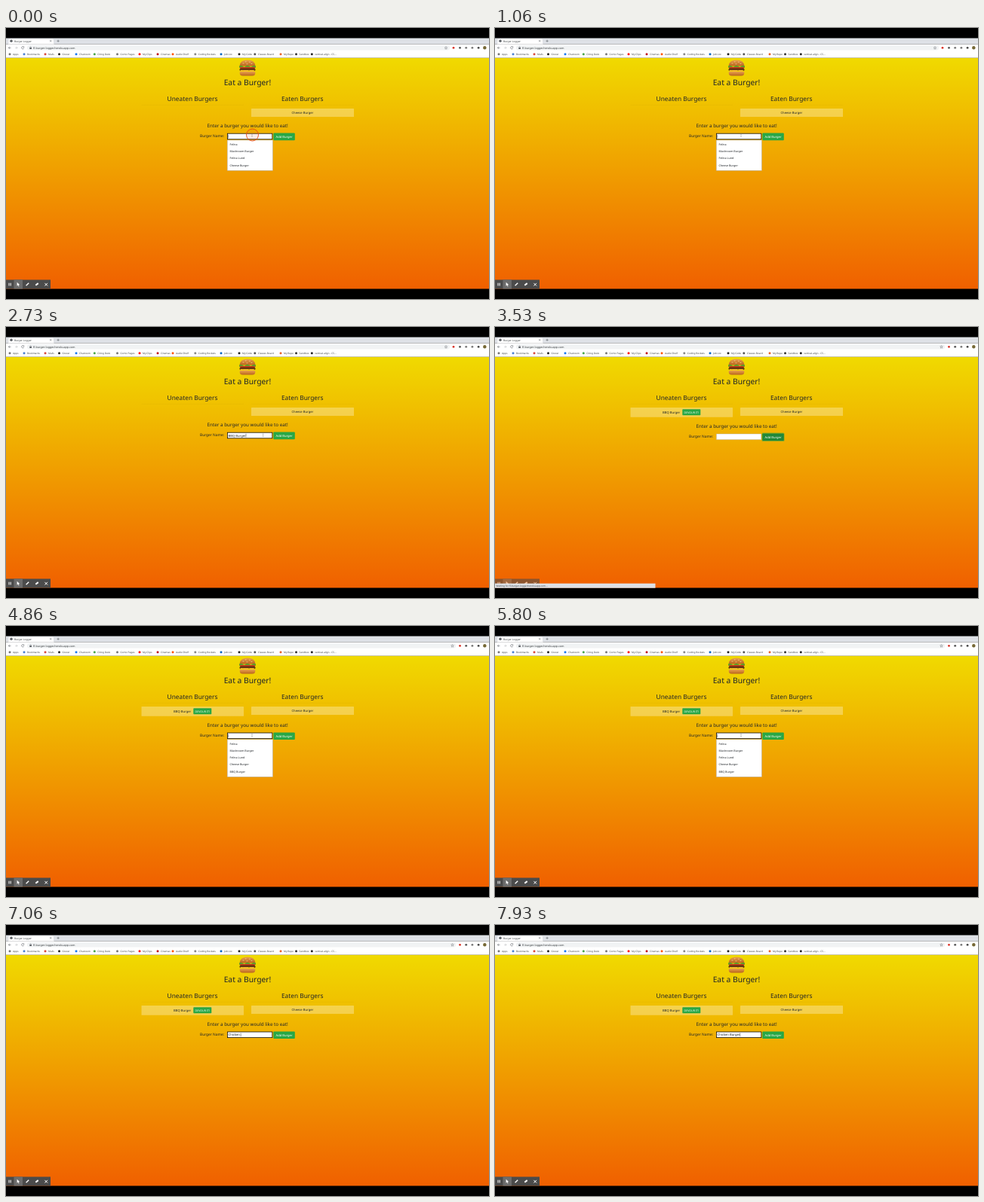
Write an HTML page that moves like this. It is 640 px wide and 360 px high and loops after 8 s.

```html
<!DOCTYPE html>
<html lang="en">
<head>
<meta charset="utf-8">
<title>Burger Logger</title>
<style>
html, body { margin: 0; width: 100%; height: 100%; overflow: hidden; background: #000; }
svg { display: block; width: 100vw; height: 100vh; }
text { font-family: "Noto Sans", "Open Sans", sans-serif; text-rendering: geometricPrecision; fill: #212529; white-space: pre; }
.mid { text-anchor: middle; }
.chrome text { fill: #3c4043; font-size: 3.2px; }
.line { fill: none; stroke: #5f6368; stroke-width: .6; }
.card { fill: #fff; fill-opacity: .3; }
.body { font-size: 4.17px; }
.white { fill: #fff; }
</style>
</head>
<body>
<svg viewBox="0 0 640 360">
  <defs>
    <linearGradient id="sky" x1="0" y1="0" x2="0" y2="1">
      <stop offset="0" stop-color="#f0da00"/><stop offset="1" stop-color="#f06000"/>
    </linearGradient>
    <linearGradient id="bun" x1="0" y1="0" x2="0" y2="1">
      <stop offset="0" stop-color="#e9a04a"/><stop offset="1" stop-color="#b9641f"/>
    </linearGradient>
  </defs>
  <rect width="640" height="360"/>
  <rect y="39.5" width="640" height="307" fill="url(#sky)"/>

  <g class="chrome">
    <rect y="13.5" width="640" height="8" fill="#dee1e6"/>
    <path d="M2 21.5Q3.500 21.500 3.500 20V16Q3.500 14.500 5 14.500H61.500Q63 14.500 63 16V20Q63 21.500 64.500 21.500Z" fill="#fff"/>
    <rect y="21.500" width="640" height="18" fill="#fff"/>
    <circle cx="7" cy="17.300" r="1.700" fill="#5f6368"/>
    <text x="11" y="18.500" style="font-size:3.35px">Burger Logger</text>
    <path class="line" d="M58.200 16.300l2 2m0-2l-2 2M67.500 17.300h3.200m-1.600-1.600v3.200"/>
    <path class="line" d="M6.500 26.300H3.500m1.400-1.500l-1.500 1.500 1.500 1.500M23.600 25.500A1.600 1.600 0 1 0 23.700 26.800M23.800 24.500v1.200h-1.200"/>
    <path class="line" opacity=".4" d="M12 26.300h3m-1.400-1.500l1.500 1.500-1.500 1.500"/>
    <rect id="omnibox" x="28" y="23" width="560" height="6.600" rx="3.300" fill="#f1f3f4"/>
    <path d="M31.300 26h2.600v2h-2.600z" fill="#5f6368"/>
    <path class="line" style="stroke-width:.4" d="M31.900 26v-.6a.7.7 0 0 1 1.400 0v.6"/>
    <text x="36" y="27.600" style="font-size:3.7px">fl-burger-logger.herokuapp.com</text>
    <g id="tools">
      <path id="star" class="line" style="stroke-width:.4" d="M0-1.700l.5 1.200 1.300.1-1 .9.300 1.300L0 1.100l-1.100.7.300-1.300-1-.9 1.300-.1z"/>
    </g>
    <g id="bookmarks"></g>
    <path d="M0 39.500H640" stroke="#dadce0" stroke-width=".4"/>
  </g>

  <g id="burger" transform="translate(320 53)">
    <path d="M-10.500-2.500Q-10-10.500 0-10.500T10.500-2.500Z" fill="url(#bun)"/>
    <path d="M-6-6h.9m2.300-2.200h.9M-1-5.200h.9M2.500-7.800h.9M5-5.500h.9" stroke="#f8dfa5" stroke-width=".7" stroke-linecap="round"/>
    <path d="M-11-2.500q2.200-1.300 4.400 0t4.400 0 4.400 0 4.400 0 4.400 0v1.900q-2.200 1.600-4.400 0t-4.400 0-4.400 0-4.400 0-4.400 0z" fill="#5f9d27"/>
    <rect x="-10" y="-.9" width="20" height="1.600" rx=".8" fill="#cf3020"/>
    <rect x="-10.500" y=".5" width="21" height="3.600" rx="1.700" fill="#54260f"/>
    <path d="M-10 2.800H10L6 5.600 2 3.600-3 6-6 3.800-8 5z" fill="#f6bd2c"/>
    <path d="M-10.200 5H10.200V7.500Q10 10.500 6.500 10.500H-6.500Q-10 10.500-10.200 7.500Z" fill="url(#bun)"/>
  </g>
  <text class="mid" x="320" y="75.900" font-size="10.3">Eat a Burger!</text>
  <g class="mid" font-size="8.34">
    <text x="247" y="96.500">Uneaten Burgers</text>
    <text x="392.700" y="96.500">Eaten Burgers</text>
  </g>
  <path d="M179.500 102.300H315M325 102.300H461" stroke="#000" stroke-opacity=".1" stroke-width=".3"/>
  <rect class="card" x="325" y="107" width="136" height="10.900" rx=".5"/>
  <text class="mid body" x="392.900" y="114.100">Cheese Burger</text>
  <g id="uneaten">
    <rect class="card" x="179.500" y="107" width="135.500" height="12.700" rx=".5"/>
    <text class="body" x="222" y="114.500">BBQ Burger</text>
    <rect x="248.300" y="109.300" width="24" height="8" rx=".8" fill="#28a745"/>
    <text class="mid white" x="260.300" y="114.600" font-size="3.6">DEVOUR IT!</text>
  </g>

  <g id="form">
    <text class="mid" x="320.200" y="132.100" font-size="6.29">Enter a burger you would like to eat!</text>
    <text x="257" y="145.300" font-size="4.87">Burger Name:</text>
    <rect id="field" x="293.400" y="140.200" width="59.400" height="7.600" fill="#fff"/>
    <text id="typed" class="body" x="294.500" y="145.500"></text>
    <path id="caret" d="M0 141.700v4.700" stroke="#000" stroke-width=".4"/>
    <rect id="glow" x="353.500" y="138.800" width="30" height="11.300" rx="1.500" fill="#28a745" opacity=".5"/>
    <rect id="add" x="354.300" y="139.600" width="28.500" height="9.700" rx="1"/>
    <text class="mid white" x="368.600" y="146" font-size="4.1">Add Burger</text>
    <g id="list">
      <rect id="panel" x="293.200" y="149" width="60.300" fill="#fff" stroke="#999" stroke-width=".4"/>
      <g id="items" font-size="3.66"></g>
    </g>
  </g>

  <g id="recorder">
    <rect y="334.500" width="59" height="12" fill="#4b4b4b"/>
    <rect x="10.500" y="334.500" width="11.500" height="12" fill="#6c6c6c"/>
    <g fill="none" stroke="#fff" stroke-width="1">
      <path d="M4 338.700v3.800m2.200-3.800v3.800M51.400 338.900l3.600 3.600m0-3.600l-3.600 3.600"/>
      <path d="M26.600 342.300l3.600-3.600" stroke-width="1.300"/>
      <path d="M39.300 341.800l3.400-2.700" stroke-width="2"/>
    </g>
    <path d="M14.600 337.800l3.700 3.500h-1.700l.9 1.900-.8.300-.8-1.900-1.300 1.200z" fill="#fff"/>
  </g>
  <g id="status" class="chrome">
    <rect y="340.700" width="212.500" height="6" fill="#dee1e6"/>
    <text x="1.500" y="344.800">Waiting for fl-burger-logger.herokuapp.com...</text>
  </g>

  <circle id="ring" r="8" fill="#e04010" fill-opacity=".1" stroke="#e64a19" stroke-width=".9"/>
  <path id="beam" d="M-.8-1.700H.8M0-1.700V1.700M-.8 1.700H.8" stroke="#777" stroke-width=".4"/>
  <path id="arrow" d="M0 0l3.200 3.100H1.500l.8 1.800-.7.300-.8-1.800L0 4.500z" stroke="#fff" stroke-width=".3"/>
</svg>
<script>
const LOOP = 8000, RELOAD = 3330, FOCUS = 4600;
const $ = id => document.getElementById(id);
const show = (id, on) => $(id).setAttribute('visibility', on ? 'visible' : 'hidden');
const set = (id, attrs) => { for (const k in attrs) $(id).setAttribute(k, attrs[k]); };
function add(parent, tag, attrs, label = '') {
  const el = document.createElementNS('http://www.w3.org/2000/svg', tag);
  for (const k in attrs) el.setAttribute(k, attrs[k]);
  el.textContent = label;
  return $(parent).appendChild(el);
}

const bookmarks = [
  [5, 'Apps', '#777'], [24, 'Bookmarks', '#4a7fd0'], [52, 'Mails', '#d84a3c'], [70.5, 'Grocer', '#222'],
  [93, 'Chatroom', '#1877f2'], [117.3, 'Citing Desk', '#47a447'], [147.5, 'Comic Pages', '#777'],
  [177, 'My Clips', '#f00'], [201, 'Cinemas', '#c11119'], [221, 'Audio Shelf', '#f50'],
  [250.8, 'Coding Rockets', '#888'], [285, 'Job List', '#0a66c2'], [309, 'My Code', '#222'],
  [329.8, 'Classes Board', '#555'], [364, 'My Repo', '#e8642c'], [384.5, 'Sandbox', '#333'],
  [405.3, 'vertical-align - CS...', '#222']
];
for (const [x, label, fill] of bookmarks) {
  add('bookmarks', 'circle', { cx: x, cy: 34.8, r: 1.5, fill });
  add('bookmarks', 'text', { x: x + 4, y: 36 }, label);
}

const dots = ['#d93025', '#555', '#777', '#444', '#7a6a30'];
dots.forEach((fill, i) => {
  const el = add('tools', 'circle', { cx: 601.5 + i * 8.2, cy: 26.3, r: i === 4 ? 2.2 : 1.4, fill });
  if (i === 0) el.id = 'badge';
  if (i === 1) el.id = 'extra';
});
for (const dy of [-1.4, 0, 1.4]) add('tools', 'circle', { cx: 634.5, cy: 26.3 + dy, r: .45, fill: '#5f6368' });

const saved = ['Felina', 'Mushroom Burger', 'Felina Lund', 'Cheese Burger', 'BBQ Burger'];
const rows = saved.map(() => add('items', 'text', { x: 296.5 }));

const firstWord = 'BBQ Burger', secondWord = 'Chicken Burger';
const firstKeys = [1200, 1330, 1530, 1730, 1930, 2060, 2200, 2260, 2400, 2530];
const secondKeys = [5930, 6060, 6200, 6330, 6460, 6600, 6730, 6930, 7260, 7460, 7530, 7660, 7730, 7860];
const clicks = [[-100, 326.5, 142, 600], [2930, 368, 146, 350], [FOCUS, 326.5, 145, 260]];
const path = [[0, 326, 142.5], [2600, 326, 142.5], [2930, 368, 146], [4060, 368, 146], [4460, 326, 145.3], [LOOP, 326, 145.3]];

function pointer(t) {
  const i = path.findIndex(p => p[0] > t);
  const [a, b] = [path[i - 1], path[i]];
  const u = (t - a[0]) / (b[0] - a[0]), e = u * u * (3 - 2 * u);
  return [a[1] + (b[1] - a[1]) * e, a[2] + (b[2] - a[2]) * e];
}

function render(t) {
  const after = t >= RELOAD;
  const keys = after ? secondKeys : firstKeys;
  const count = keys.filter(k => k <= t).length;
  const value = (after ? secondWord : firstWord).slice(0, count);
  const focused = t < 2930 || t >= FOCUS;

  show('uneaten', after);
  set('form', { transform: `translate(0 ${after ? 1.8 : 0})` });
  set('field', { stroke: focused ? '#101010' : '#aaa', 'stroke-width': focused ? .8 : .4 });
  $('typed').textContent = value;
  const last = count ? keys[count - 1] : after ? FOCUS : 0;
  const width = value ? $('typed').getComputedTextLength() : 0;
  set('caret', { transform: `translate(${294.7 + width} 0)` });
  show('caret', focused && (t - last) % 1000 < 500);

  const matches = saved.slice(0, after ? 5 : 4).filter(s => s.startsWith(value));
  show('list', focused && matches.length > 0 && count < 3);
  set('panel', { height: 3.4 + matches.length * 9.25 });
  rows.forEach((row, i) => {
    row.textContent = matches[i] || '';
    row.setAttribute('y', 155.8 + i * 9.25);
  });

  const hover = t >= 2860 && t < 4130;
  set('add', { fill: hover ? '#218838' : '#28a745' });
  show('glow', t >= 2930 && t < 3860);

  const loading = t >= 2930 && t < 3860;
  show('status', loading);
  set('recorder', { opacity: after && t < 4060 ? .6 : 1 });

  set('star', { transform: `translate(${after ? 591.5 : 583} 26.3)` });
  set('omnibox', { width: after ? 568 : 560 });
  set('badge', { cx: after ? 601.5 : 593 });
  set('extra', { cx: after ? 609.7 : 601.5 });
  show('spare', !after);

  const [x, y] = pointer(t);
  const overField = x < 352;
  set('beam', { transform: `translate(${x} ${y})` });
  set('arrow', { transform: `translate(${x} ${y})` });
  show('beam', overField && t < 6000);
  show('arrow', !overField && (t < RELOAD || t >= 3860));

  const click = clicks.find(c => t >= c[0] && t < c[0] + c[3]);
  show('ring', !!click);
  if (click) set('ring', { cx: click[1], cy: click[2], opacity: Math.min(1, 1.3 * (1 - (t - click[0]) / click[3])) });
}

add('tools', 'circle', { id: 'spare', cx: 609.7, cy: 26.3, r: 1.4, fill: '#777' });
const start = performance.now();
function tick() {
  render((performance.now() - start) % LOOP);
  requestAnimationFrame(tick);
}
tick();
</script>
</body>
</html>
```
